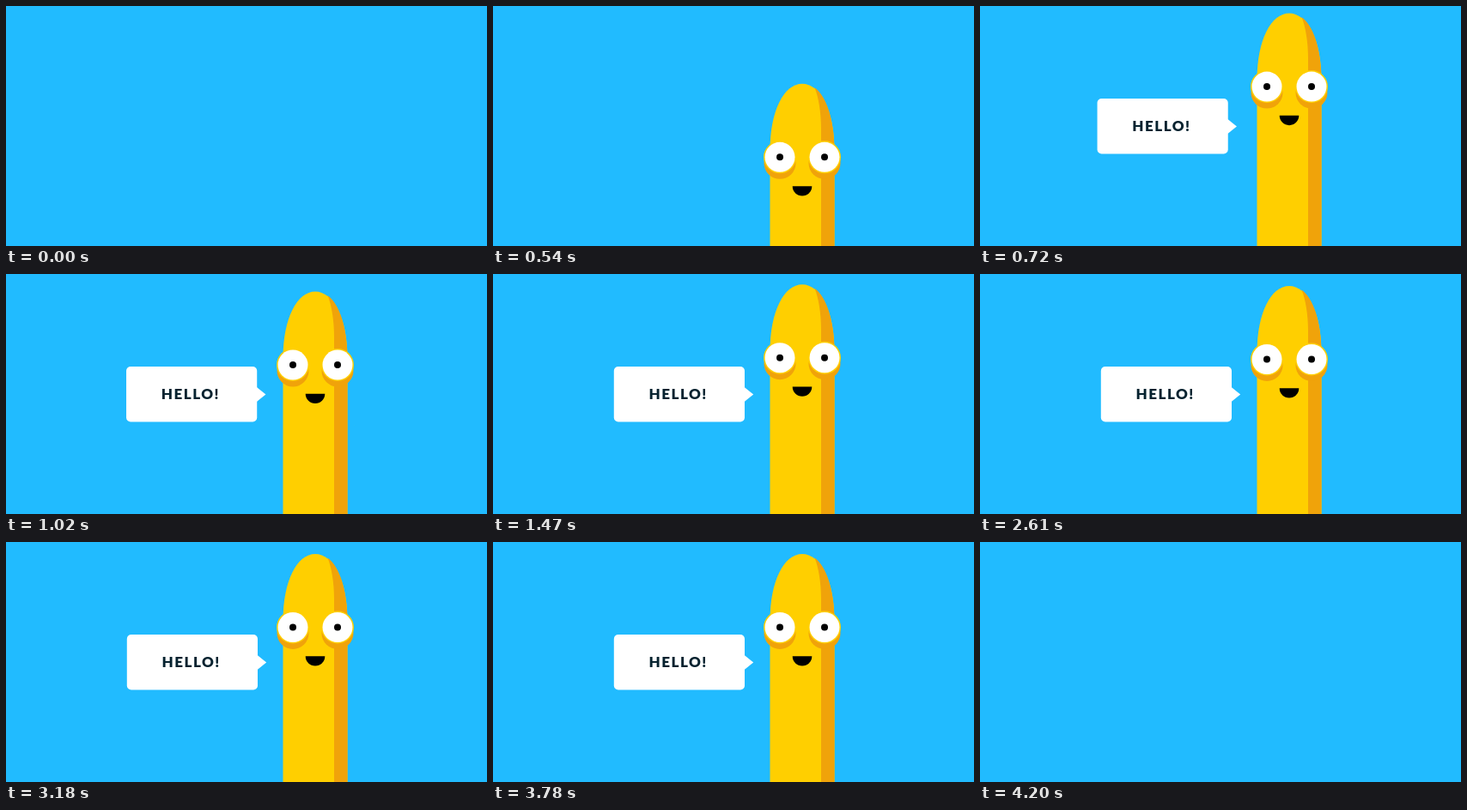
An HTML page that plays this animation: 560 px wide and 280 px high, repeating every 4500 ms.

```html
<!DOCTYPE html>
<html lang="en">
<head>
<meta charset="utf-8">
<title>Hello</title>
<style>
  html, body { margin: 0; height: 100%; overflow: hidden; background: #21bbff; }
  svg { display: block; width: 100vw; height: 100vh; }
  text { font: 900 17px Lato, sans-serif; letter-spacing: 1.5px; fill: #06222f; }
</style>
</head>
<body>
<svg viewBox="0 0 560 280">
  <defs>
    <g id="eye">
      <circle cy="7" r="18.5" fill="#f0a30a"/>
      <circle r="19" fill="#ffcf00"/>
      <circle r="17.5" fill="#fff"/>
      <circle r="4"/>
    </g>
  </defs>
  <g id="bubble">
    <rect x="140.8" y="108" width="152.2" height="64.5" rx="5" fill="#fff"/>
    <path d="M292 131.5L303.2 140.5L292 149.5Z" fill="#fff"/>
    <text x="215.7" y="146" text-anchor="middle">HELLO!</text>
  </g>
  <g id="hero">
    <path d="M322.5 400V92C322.5 45 339 14 360 14S397.5 45 397.5 92V400Z" fill="#ffcf00"/>
    <path d="M382 400V66C382 47 379 30 374.5 18.5C388 28 397.5 56 397.5 92V400Z" fill="#f0a30a"/>
    <use href="#eye" x="334" y="99.5"/>
    <use href="#eye" x="386" y="99.5"/>
    <path d="M348.7 133.3H371.3A11.3 11.3 0 0 1 348.7 133.3Z"/>
  </g>
</svg>
<script>
const LOOP = 4500, STEP = 30;
const hero = document.getElementById('hero');
const bubble = document.getElementById('bubble');

// Linear arrival at speed (px/s), then a decaying swing around rest.
function arrive(t, end, speed, swing, freq) {
  const s = (t - end) / 1000;
  return s < 0 ? -s * speed : -swing * Math.sin(2 * Math.PI * freq * s) * Math.exp(-4 * s);
}

function draw(now) {
  const t = Math.floor(now % LOOP / STEP) * STEP;
  const leave = Math.max(0, t - 4055) / 140;
  const y = arrive(t, 593, 1450, 60.7, 3.75) + 268 * leave;
  const x = arrive(t, 610, 240, 10, 3.5) - 306 * leave;
  hero.setAttribute('transform', `translate(0 ${y.toFixed(3)})`);
  bubble.setAttribute('transform', `translate(${x.toFixed(3)} 0)`);
  bubble.setAttribute('opacity', Math.min(1, Math.max(0, (t - 540) / 60)));
  requestAnimationFrame(draw);
}
draw(0);
</script>
</body>
</html>
```
